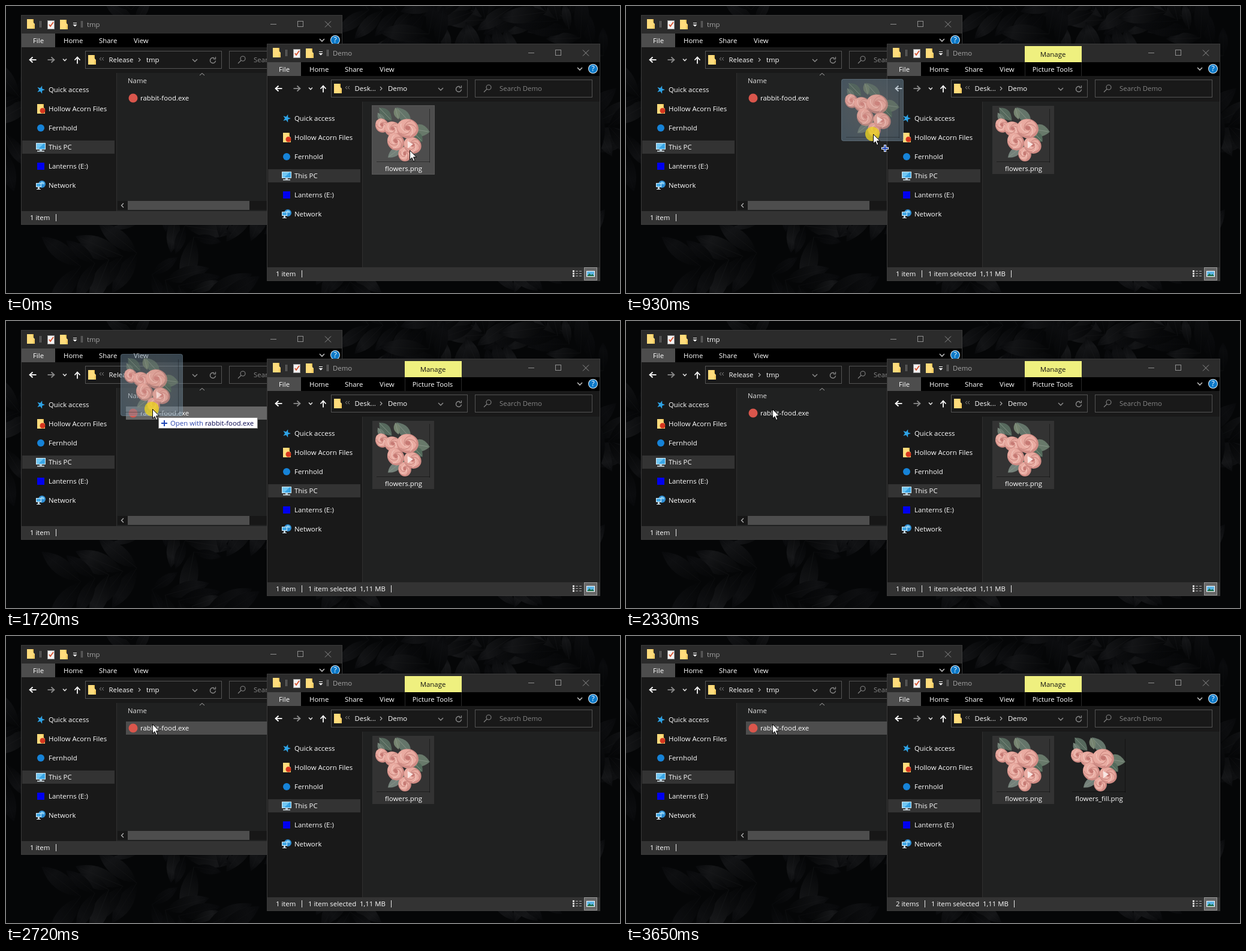
Write an HTML page with a canvas that moves like this. It is 1024 px wide and 480 px high and loops after 4350 ms.

```html
<!DOCTYPE html>
<html lang="en">
<head>
<meta charset="utf-8">
<title>Drag and drop</title>
<style>
html, body { margin: 0; width: 100%; height: 100%; overflow: hidden; background: #050607; }
canvas { display: block; width: 100vw; height: 100vh; }
</style>
</head>
<body>
<canvas id="stage" width="1024" height="480"></canvas>
<script>
const W = 1024, H = 480, LOOP = 4350;
const FONT = '"Open Sans", "Noto Sans", sans-serif';
const screen = document.getElementById('stage').getContext('2d');
let g = screen;

// Pointer steps: start time, x, y
const POINTER = [
  [0, 673, 241], [70, 671, 241], [240, 670, 236], [310, 668, 231], [390, 667, 227],
  [700, 660, 227], [780, 596, 226], [850, 506, 221], [930, 412, 214], [990, 360, 203],
  [1070, 322, 193], [1160, 304, 188], [1230, 288, 183], [1320, 274, 177], [1400, 264, 170],
  [1480, 255, 162], [1560, 249, 154], [1640, 246, 149], [1720, 244, 147]
];
// Console steps: start time, opacity, scale
const CONSOLE = [[0, 0, 1], [2410, .28, .94], [2490, .64, .972], [2560, 1, 1], [2640, .4, .96], [2720, 0, 1]];

const stepAt = (list, t) => list.filter(s => s[0] <= t).pop();

function rect(x, y, w, h, fill) {
  g.fillStyle = fill;
  g.fillRect(x, y, w, h);
}
function box(x, y, w, h, color) {
  g.strokeStyle = color;
  g.lineWidth = 1;
  g.strokeRect(x + .5, y + .5, w - 1, h - 1);
}
function disc(x, y, r, fill) {
  g.fillStyle = fill;
  g.beginPath();
  g.arc(x, y, r, 0, 7);
  g.fill();
}
function oval(x, y, rx, ry, a, fill) {
  g.fillStyle = fill;
  g.beginPath();
  g.ellipse(x, y, rx, ry, a, 0, 7);
  g.fill();
}
function path(points, close) {
  g.beginPath();
  for (let i = 0; i < points.length; i += 2) g.lineTo(points[i], points[i + 1]);
  if (close) g.closePath();
}
function line(points, color, width = 1) {
  path(points);
  g.strokeStyle = color;
  g.lineWidth = width;
  g.stroke();
}
function poly(points, fill) {
  path(points, true);
  g.fillStyle = fill;
  g.fill();
}
// Text centred vertically on y; returns its width
function text(s, x, y, color = '#fff', align = 'left', size = 11.4) {
  g.font = size + 'px ' + FONT;
  g.textAlign = align;
  g.fillStyle = color;
  g.fillText(s, x, y + 4);
  return g.measureText(s).width;
}
function at(x, y, draw) {
  g.save();
  g.translate(x, y);
  draw();
  g.restore();
}
const chevron = (x, y, r, color, w) => line([x - r, y - r / 2, x, y + r / 2, x + r, y - r / 2], color, w);

function folder(x, y) {
  rect(x - 6, y - 8, 11, 16, '#e9b94b');
  poly([x - 6, y - 8, x + 3, y - 8, x + 4, y - 3, x + 7, y, x + 7, y + 8, x - 6, y + 8], '#ffdc7c');
  rect(x + 4, y + 1, 3, 7, '#f5cb62');
}
function page(x, y) {
  rect(x - 6, y - 7, 12, 15, '#f2f2f2');
  box(x - 6, y - 7, 12, 15, '#999');
  line([x - 3, y, x - 1, y + 3, x + 4, y - 4], '#d8502c', 1.8);
}
function star(x, y) {
  const p = [];
  for (let i = 0; i < 10; i++) {
    const r = i % 2 ? 2.8 : 7, a = i * Math.PI / 5 - 1.25;
    p.push(x + r * Math.cos(a), y + r * Math.sin(a));
  }
  poly(p, '#2ea3e6');
}
function monitor(x, y) {
  rect(x - 8, y - 7, 16, 11, '#d5ebf7');
  rect(x - 7, y - 6, 14, 9, '#3aa5e4');
  poly([x - 7, y - 6, x + 5, y - 6, x - 4, y + 3, x - 7, y + 3], '#72c7f3');
  rect(x - 2, y + 4, 4, 2, '#a7bdc9');
  rect(x - 6, y + 6, 12, 1.5, '#dce8ee');
}
function globe(x, y) {
  disc(x + 2, y - 2, 6, '#2f8fd5');
  oval(x + 3, y - 4, 3, 2, .4, '#85cdf2');
  rect(x - 8, y - 4, 9, 7, '#d9edf8');
  rect(x - 7, y - 3, 7, 5, '#43a9e6');
  rect(x - 5, y + 3, 3, 3, '#b9ccd6');
  rect(x - 7, y + 6, 7, 1, '#dce8ee');
}
const PLACES = [
  ['Quick access', star],
  ['Hollow Acorn Files', (x, y) => { folder(x, y); disc(x + 3, y + 3, 4.5, '#d5361f'); }],
  ['Fernhold', (x, y) => disc(x, y, 6, '#1683d8')],
  ['This PC', monitor],
  ['Lanterns (E:)', (x, y) => rect(x - 6, y - 6, 12, 12, '#0000f0')],
  ['Network', globe]
];

function arrow(x, y, angle, color) {
  at(x, y, () => {
    g.rotate(angle);
    line([-5.5, 0, 5.5, 0], color, 1.8);
    line([-.5, -4.5, -5.5, 0, -.5, 4.5], color, 1.8);
  });
}

// Explorer window chrome in local coordinates
function explorer(w, h, title, crumbs, active) {
  rect(0, 0, w, h, '#191919');
  rect(0, 0, w, 31, '#2b2b2b');
  rect(160, 97, w - 160, h - 120, '#202121');
  rect(159, 97, 1, h - 120, '#2f2f2f');
  rect(0, h - 23, w, 23, '#333');

  folder(16, 15);
  page(50, 16);
  folder(71, 16);
  for (const x of [31, 100]) {
    rect(x, 10, 1, 11, '#777');
    rect(x + 2, 10, 1, 11, '#777');
  }
  rect(87, 13, 6, 1, '#fff');
  poly([86.5, 16, 93.5, 16, 90, 19.5], '#fff');
  text(title, 110, 16, active ? '#fff' : '#a5a5a5');
  const ink = '#909090';
  rect(w - 120, 15, 10, 1, ink);
  box(w - 75, 10, 10, 10, ink);
  line([w - 29, 10.5, w - 19, 20.5], ink);
  line([w - 19, 10.5, w - 29, 20.5], ink);

  rect(1, 31, w - 2, 23, '#000');
  rect(1, 31, 56, 23, '#4d4d4d');
  text('File', 29, 43, '#fff', 'center');
  text('Home', 71, 43);
  text('Share', 130, 43);
  text('View', 188, 43);
  chevron(w - 34, 42, 4, '#bbb', 1.6);
  disc(w - 12, 42, 8, '#e8f4fb');
  disc(w - 12, 42, 7, '#0b79c9');
  text('?', w - 12, 42, '#fff', 'center', 12);

  arrow(20, 75, 0, '#fff');
  arrow(50, 75, Math.PI, '#8a8a8a');
  chevron(73, 75, 3, '#ddd', 1.6);
  arrow(94, 76, Math.PI / 2, '#fff');
  box(107, 60, 228, 30, '#535353');
  folder(118, 75);
  for (const x of [131, 135]) line([x + 3, 71, x, 73.5, x + 3, 76], '#888');
  text(crumbs[0], 146.5, 75);
  line([crumbs[2] - 1, 72, crumbs[2] + 2, 75, crumbs[2] - 1, 78], '#aaa', 1.2);
  text(crumbs[1], crumbs[3], 75);
  chevron(290, 76, 4, '#8a8a8a', 1.5);
  g.beginPath();
  g.arc(320, 76, 4.5, .1, 5.3);
  g.strokeStyle = '#8a8a8a';
  g.lineWidth = 1.4;
  g.stroke();
  line([324.5, 70, 324.5, 73.7, 320.8, 73.7], '#8a8a8a', 1.2);

  box(347, 60, w - 360, 30, '#535353');
  g.beginPath();
  g.arc(370, 73, 4, 0, 7);
  g.strokeStyle = '#858585';
  g.lineWidth = 1.1;
  g.stroke();
  line([367, 76, 362, 81], '#858585', 1.1);
  text('Search ' + title, 388, 75, '#858585');

  PLACES.forEach(([name, icon], i) => {
    const y = 125 + 32 * i;
    if (i === 3) rect(2, y - 11, 154, 22, '#333');
    icon(33, y);
    text(name, 46, y);
  });
  box(0, 0, w, h, '#3b3b3b');
}

const separator = (x, y) => rect(Math.round(x), y - 6, 1, 12, '#e8e8e8');

function sourceWindow(t) {
  explorer(536, 351, 'tmp', ['Release', 'tmp', 197, 209], t >= 2250 && t < 2560);
  text('Name', 178, 110, '#dedede');
  line([298, 101, 302, 97.5, 306, 101], '#aaa');
  if (t >= 1480 && t < 2250) rect(175, 128, 340, 22, '#666');
  if (t >= 2720) rect(175, 128, 340, 22, '#4d4d4d');
  disc(187, 139, 7.5, '#d9564c');
  text('rabbit-food.exe', 199, 139);
  rect(161, 311, 374, 15, '#171717');
  rect(178, 311, 203, 15, '#4d4d4d');
  line([171, 315, 167.5, 318.5, 171, 322], '#bbb', 1.2);
  text('1 item', 15, 339);
  separator(58, 339);
}

function rose(x, y, r, a) {
  oval(x, y, r, r * .9, a, '#d08c85');
  oval(x - r * .08, y - r * .1, r * .9, r * .76, a, '#e9aba1');
  for (let i = 0; i < 5; i++) {
    const k = a + i * 1.26;
    g.beginPath();
    g.ellipse(x + Math.cos(k) * r * .25, y + Math.sin(k) * r * .22, r * .55, r * .42, k, 3.5, 6);
    g.strokeStyle = i % 2 ? '#f5cdc4' : '#c37f78';
    g.lineWidth = 1;
    g.stroke();
  }
  oval(x, y - 1, r * .25, r * .2, a, '#c67a74');
}
function leaf(x, y, l, w, a, fill = '#64756a') {
  at(x, y, () => {
    g.rotate(a);
    g.beginPath();
    g.moveTo(-l, 0);
    g.quadraticCurveTo(-l * .1, -w * 1.7, l, 0);
    g.quadraticCurveTo(-l * .1, w * 1.7, -l, 0);
    g.fillStyle = fill;
    g.fill();
    line([-l, 0, l * .8, 0], '#8c998c', .8);
  });
}
function bouquet() {
  leaf(17, 11, 15, 9, .8, '#56695d');
  leaf(10, 18, 11, 6, 1, '#6c7b70');
  leaf(47, 13, 18, 10, -2.3);
  leaf(36, 10, 10, 6, 1.3, '#75836f');
  leaf(75, 38, 16, 12, .15, '#68796a');
  leaf(71, 49, 11, 8, .8, '#536a5b');
  leaf(32, 75, 14, 8, 2.5, '#74817a');
  leaf(46, 69, 10, 6, 1.6, '#566a5c');
  rose(11, 30, 12, 1.1);
  rose(29, 36, 14, .4);
  rose(49, 78, 12, 1.4);
  rose(34, 57, 15, .9);
  rose(62, 63, 15, .5);
  rose(54, 35, 18, .2);
  poly([54, 56, 63, 61, 54, 68], '#f8e6e2');
}
function thumb(x, y) {
  at(x, y, () => {
    rect(90, 2, 1, 90, 'rgba(0,0,0,.4)');
    rect(2, 90, 89, 1, 'rgba(0,0,0,.4)');
    bouquet();
  });
}
// Placeholder shown until the thumbnail is ready
function pictureIcon(x, y) {
  poly([x, y, x + 48, y, x + 64, y + 16, x + 64, y + 84, x, y + 84], '#f4f4f4');
  poly([x + 48, y, x + 48, y + 16, x + 64, y + 16], '#c8c8c8');
  rect(x + 10, y + 30, 44, 34, '#56b4ea');
  poly([x + 10, y + 64, x + 26, y + 44, x + 36, y + 54, x + 44, y + 48, x + 54, y + 64], '#287fb7');
}

function demoWindow(t) {
  const done = t >= 3480;
  explorer(556, 397, 'Demo', ['Desk...', 'Demo', 190, 202], false);
  if (t >= 700) {
    rect(230, 4, 95, 27, '#eff07f');
    text('Manage', 277, 18, '#111', 'center');
    rect(230, 31, 1, 23, '#2a2a2a');
    rect(324, 31, 1, 23, '#2a2a2a');
    text('Picture Tools', 276.5, 43, '#fff', 'center');
  }
  if (t < 700) {
    rect(175, 103, 105, 116, t < 540 ? '#4d4d4d' : '#666');
    box(175, 103, 105, 116, t < 540 ? '#575757' : '#777');
  } else rect(176, 104, 103, 114, '#333');
  thumb(181, 107);
  text('flowers.png', 228, 209, '#fff', 'center');
  if (done) {
    if (t < 3650) pictureIcon(322, 111);
    else thumb(307, 107);
    text('flowers_fill.png', 354, 209, '#fff', 'center');
  }

  const y = 385;
  let x = 15 + Math.floor(text(done ? '2 items' : '1 item', 15, y)) + 10;
  separator(x, y);
  if (t >= 540) {
    x += 11;
    x += Math.floor(text('1 item selected', x, y)) + 6;
    x += Math.floor(text('1,11 MB', x, y)) + 10;
    separator(x, y);
  }
  for (let i = 0; i < 3; i++) {
    rect(510, 379 + i * 4, 3, 3, '#ddd');
    for (const c of [515, 521]) rect(c, 380 + i * 4, 4, 1, '#aaa');
  }
  rect(529, 374, 22, 22, '#666');
  box(529, 374, 22, 22, '#999');
  rect(533, 380, 14, 10, '#fff');
  rect(534, 381, 12, 8, '#5db4e5');
  poly([534, 389, 538, 384, 541, 387, 543, 385, 546, 389], '#25714b');
}

function plus(x, y, w) {
  rect(x - w, y - 1, w * 2, 2, '#1d45b5');
  rect(x - 1, y - w, 2, w * 2, '#1d45b5');
}
function dragImage(x, y, t) {
  at(x - 53, y - 92, () => {
    const glow = g.createRadialGradient(52, 52, 10, 52, 52, 75);
    glow.addColorStop(0, 'rgba(140,150,156,.48)');
    glow.addColorStop(1, 'rgba(108,138,160,.48)');
    g.beginPath();
    g.roundRect(.5, .5, 103, 103, 3);
    g.fillStyle = glow;
    g.fill();
    g.strokeStyle = 'rgba(140,165,182,.4)';
    g.lineWidth = 1;
    g.stroke();
    g.globalAlpha = .75;
    thumb(6, 7);
  });
  if (t < 930) return;
  at(x + 10, y + 14, () => {
    if (t < 990) {
      rect(4, 8, 12, 4, '#fff');
      rect(8, 4, 4, 12, '#fff');
      plus(10, 10, 5);
      return;
    }
    const [verb, name] = t < 1480 ? ['Copy to ', 'tmp'] : ['Open with ', 'rabbit-food.exe'];
    g.font = '11.4px ' + FONT;
    const w = Math.round(g.measureText(verb + name).width + 27);
    rect(0, 0, w, 19, '#fff');
    box(0, 0, w, 19, '#767676');
    plus(10, 10, 5);
    const dx = text(verb, 20, 9.5, '#2c46ad');
    text(name, 20 + dx, 9.5, t < 1480 ? '#2c46ad' : '#080850');
  });
}
function pointer(x, y) {
  at(x, y, () => {
    path([.5, .5, .5, 16, 4, 12.7, 6.5, 18.5, 9, 17.5, 6.5, 11.8, 11.5, 11.8], true);
    g.fillStyle = '#fff';
    g.fill();
    g.strokeStyle = '#000';
    g.lineWidth = 1;
    g.stroke();
  });
}

function consoleWindow(alpha, scale) {
  if (!alpha) return;
  at(430, 290, () => {
    g.scale(scale, scale);
    g.translate(-430, -290);
    g.globalAlpha = alpha;
    rect(-67, 66, 993, 490, '#0c0c0c');
    rect(909, 66, 17, 490, '#171717');
    rect(910, 84, 15, 17, '#686868');
    line([914, 78, 917.5, 74.5, 921, 78], '#aaa', 1.5);
    g.globalAlpha = Math.min(1, alpha * 1.25);
    rect(-67, 36, 993, 30, '#000');
    text('C:\\git\\rabbit-food\\x64\\Release\\tmp\\rabbit-food.exe', 247, 50.5, '#fff', 'right', 11.7);
    rect(806, 50, 10, 1, '#fff');
    box(851, 46, 10, 10, '#fff');
    line([898, 46, 908, 56], '#fff');
    line([908, 46, 898, 56], '#fff');
  });
}

// Dark foliage, painted once: fronds of paired leaves, lit towards the tips
function foliage() {
  const c = document.createElement('canvas');
  c.width = W;
  c.height = H;
  g = c.getContext('2d');
  rect(0, 0, W, H, '#050607');
  let seed = 11;
  const rnd = () => (seed = seed * 16807 % 2147483647) / 2147483647;
  for (let i = 0; i < 46; i++) {
    const x = rnd() * W, y = rnd() * H, a = rnd() * 6.3, n = 3 + rnd() * 4;
    for (let k = 0; k < n; k++) {
      for (const side of [-1, 1]) {
        const b = a + side * (.6 + rnd() * .4), l = 45 + rnd() * 45, v = 10 + rnd() * 13 | 0;
        at(x + Math.cos(a) * k * 24, y + Math.sin(a) * k * 24, () => {
          g.rotate(b);
          const shade = g.createLinearGradient(0, -l * .15, l, l * .15);
          shade.addColorStop(0, '#040506');
          shade.addColorStop(.7, `rgb(${v},${v + 1},${v + 3})`);
          shade.addColorStop(1, '#07080a');
          g.beginPath();
          g.moveTo(0, 0);
          g.quadraticCurveTo(l * .5, -l * .34, l, 0);
          g.quadraticCurveTo(l * .5, l * .34, 0, 0);
          g.fillStyle = shade;
          g.fill();
          line([0, 0, l * .9, 0], `rgba(${v + 8},${v + 9},${v + 11},.6)`, .7);
        });
      }
    }
  }
  g = screen;
  return c;
}
const wall = foliage();

function render(t) {
  g.drawImage(wall, 0, 0);
  at(25, 15, () => sourceWindow(t));
  at(435, 63, () => demoWindow(t));
  const [, x, y] = stepAt(POINTER, t);
  const [, alpha, scale] = stepAt(CONSOLE, t);
  consoleWindow(alpha, scale);
  if (t >= 700 && t < 2250) dragImage(x, y, t);
  if (t >= 540 && t < 2250) disc(x - 1, y, 12, 'rgba(236,212,32,.78)');
  pointer(x, y);
}

const start = performance.now();
function tick() {
  render((performance.now() - start) % LOOP);
  requestAnimationFrame(tick);
}
tick();
</script>
</body>
</html>
```
